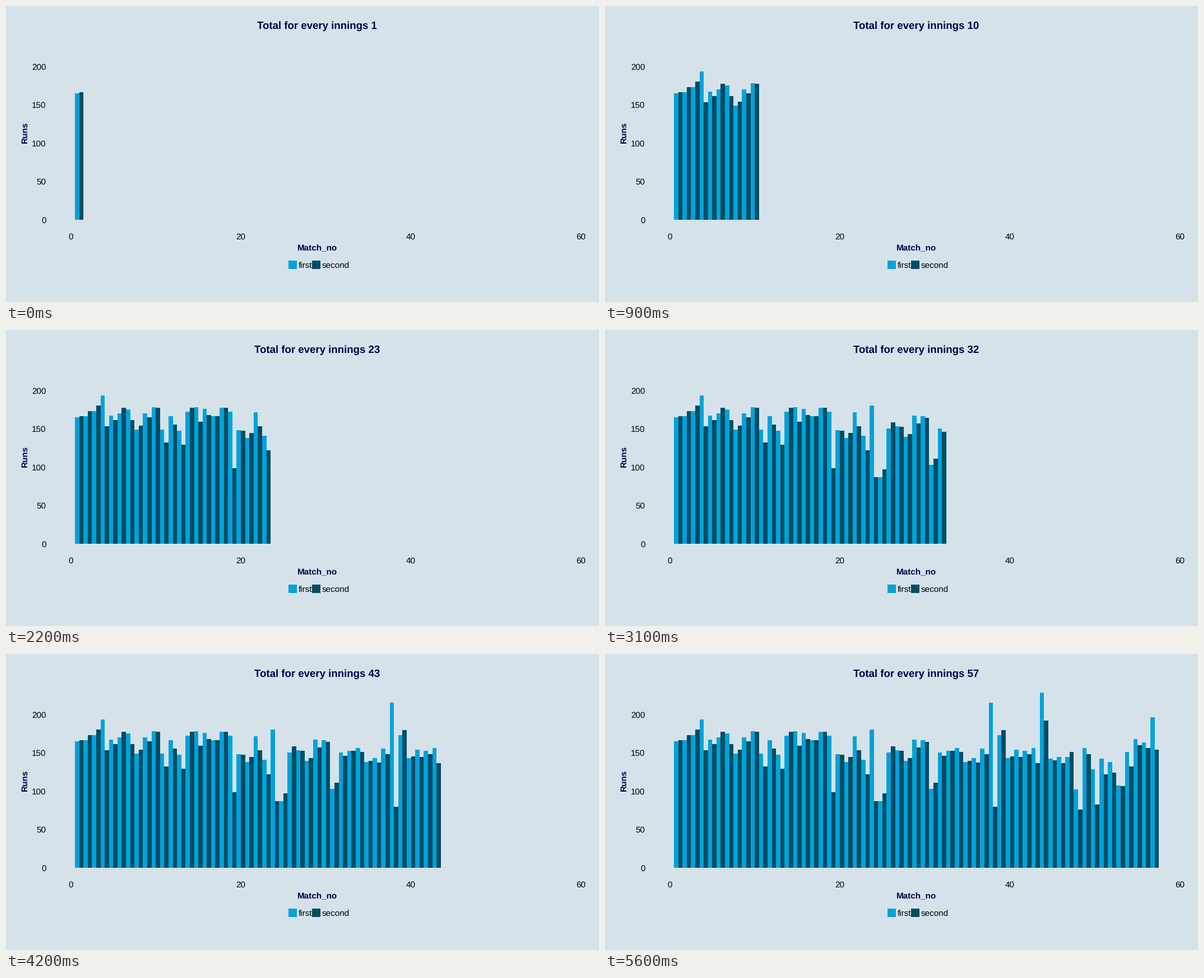
Recreate the animation shown at these times as a matplotlib script. Size 1058x529 px, loop 5700 ms.

```python
import random

import matplotlib.pyplot as plt
from matplotlib.animation import FuncAnimation
from matplotlib.patches import Rectangle

W, H, DPI = 1058, 529, 100
BG, NAVY = "#d5e2e9", "#00004f"
COLORS = ("#01a2d9", "#014d64")
X0, Y0 = 115.4, 381.7        # pixel position of the chart's zero point
DX, DY = 15.18, 1.37         # pixels per match and per run
MATCHES = 57

# The matches that stand out: number -> runs in each innings
KEY = {1: (165, 166), 4: (193, 153), 19: (172, 98), 24: (180, 87),
       25: (87, 97), 31: (103, 111), 38: (215, 79), 44: (228, 192),
       48: (102, 76), 50: (128, 82), 53: (107, 106), 57: (196, 154)}

plt.rcParams["font.family"] = "Liberation Sans"
plt.rcParams["text.hinting"] = "none"
fig = plt.figure(figsize=(W / DPI, H / DPI), dpi=DPI, facecolor=BG)
ax = fig.add_axes([0, 0, 1, 1])
ax.set_xlim(0, W)
ax.set_ylim(H, 0)
ax.axis("off")


def label(x, y, text, size=15.3, ha="center", **style):
    return ax.text(x, y, text, fontsize=size * 72 / DPI, ha=ha,
                   va="baseline", **style)


def box(x, y, w, h, color):
    return ax.add_patch(Rectangle((x, y), w, h, fc=color, lw=0,
                                  antialiased=False))


def scores(rng):
    """An ordinary match: a middling total and a close chase."""
    total = rng.randint(138, 178)
    return total, total + rng.randint(-20, 8)


def bars(match, runs):
    left = X0 + DX * (match - 0.5)
    return [box(left + side * DX / 2, Y0 - n * DY, DX / 2, n * DY, color)
            for side, (n, color) in enumerate(zip(runs, COLORS))]


bold = dict(color=NAVY, weight="bold")
title = label(555, 40.5, "", 18.67, **bold)
label(555.3, 437.5, "Match_no", **bold)
label(37.5, 225.5, "Runs", rotation=90, rotation_mode="anchor", **bold)

for runs in range(0, 201, 50):
    label(71.5, Y0 - runs * DY + 5.8, str(runs), ha="right")
for match in range(0, 61, 20):
    label(X0 + match * DX, 417, str(match))

for x, name, color in zip((504, 546), ("first", "second"), COLORS):
    box(x, 455, 15, 15, color)
    label(x + 17.3, 468.5, name, ha="left")

rng = random.Random(11)
pairs = [bars(m, KEY.get(m) or scores(rng)) for m in range(1, MATCHES + 1)]


def draw(frame):
    title.set_text(f"Total for every innings {frame + 1}")
    for i, pair in enumerate(pairs):
        for patch in pair:
            patch.set_visible(i <= frame)
    return [title]


anim = FuncAnimation(fig, draw, frames=MATCHES, interval=100,
                     repeat=True, repeat_delay=0, blit=False)
plt.show()
```
